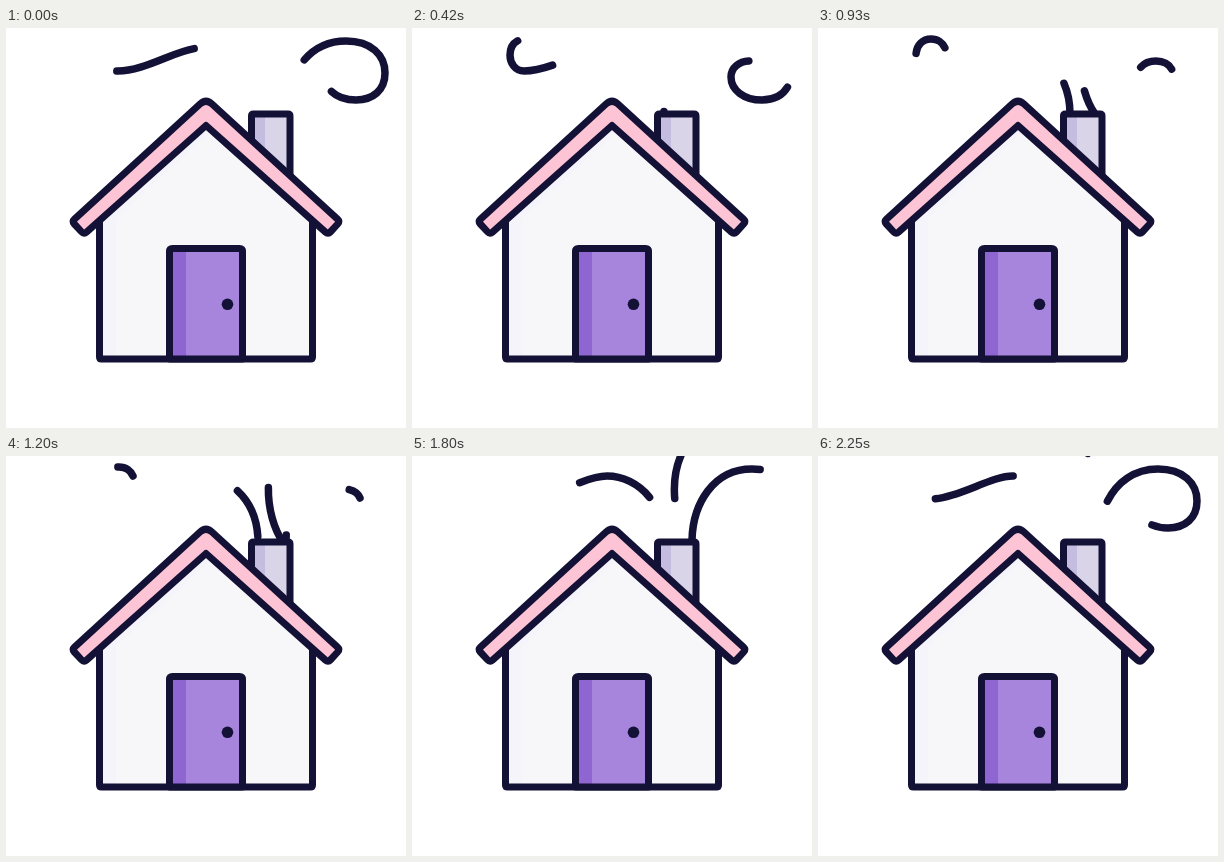
Recreate the animation shown at these times as an HTML page with a canvas. Size 400x400 px, loop 2310 ms.

```html
<!DOCTYPE html>
<html lang="en">
<head>
<meta charset="utf-8">
<title>House with smoke</title>
<style>
html, body { margin: 0; width: 100%; height: 100%; overflow: hidden; background: #fff; }
canvas { display: block; width: 400px; height: 400px; }
</style>
</head>
<body>
<canvas id="stage" width="400" height="400"></canvas>
<script>
const LOOP = 2310, STEP = 30, LAG = 690;
const INK = '#131136';
const ctx = document.getElementById('stage').getContext('2d');
ctx.lineCap = ctx.lineJoin = 'round';

const clamp = (v) => Math.min(1, Math.max(0, v));

const ease = (start, duration) => (t) => {
  const u = clamp((t - start) / duration);
  return u * u * (3 - 2 * u);
};

// Smooth curve through [time, progress] keys, flat at both ends
const through = (keys) => {
  const last = keys.length - 1;
  const slope = (i) => i === 0 || i === last ? 0 :
    (keys[i + 1][1] - keys[i - 1][1]) / (keys[i + 1][0] - keys[i - 1][0]);
  return (t) => {
    if (t <= keys[0][0]) return 0;
    if (t >= keys[last][0]) return 1;
    const i = keys.findIndex((key) => key[0] > t) - 1;
    const [t0, p0] = keys[i], [t1, p1] = keys[i + 1];
    const span = t1 - t0, u = (t - t0) / span, v = 1 - u;
    return clamp(p0 * (1 + 2 * u) * v * v + p1 * u * u * (3 - 2 * u) +
      span * (slope(i) * u * v * v - slope(i + 1) * u * u * v));
  };
};

const wisp = (d, progress) => {
  const path = document.createElementNS('http://www.w3.org/2000/svg', 'path');
  path.setAttribute('d', d);
  return { path: new Path2D(d), length: path.getTotalLength(), progress };
};

const wisps = [
  wisp('M252 86C252 43 222 20 195 20C172 20 140 43 112 43C103 43 98 35 98 27' +
    'C98 18 104 11 113 11C120 11 125 15 127 20', ease(240, 3110)),
  wisp('M277 86C263 66 256 27 270 -3L273 -8', ease(520, 1230)),
  wisp('M280 86C280 50 300 13 340 13C365 13 379 27 379 45C379 62 367 72 350 72' +
    'C332 72 319 62 319 49C319 39 328 33 338 33C346 33 352 37 354 42',
    through([[960, 0], [1110, .01], [1470, .084], [1620, .196], [1860, .44],
      [2250, .751], [2550, .876], [2910, .968], [3240, .995], [3560, 1]]))
];

const wall = new Path2D('M93.5 190L200 96L306.5 190V329Q306.5 331 304.5 331H95.5Q93.5 331 93.5 329Z');
const wallLight = new Path2D('M110 190L206 103L306.5 190V331H110Z');
const roof = new Path2D('M68.5 191.2L194 76Q200 70.5 206 76L331.5 191.2Q334 193.5 331.7 196' +
  'L324.3 204Q322 206.5 319.5 204.2L200 97.5L80.5 204.2Q78 206.5 75.7 204L68.3 196Q66 193.5 68.5 191.2Z');
const chimney = new Path2D('M245.5 160V88Q245.5 86 247.5 86H282Q284 86 284 88V160Z');
const door = new Path2D('M163.5 331V223.5Q163.5 220.5 166.5 220.5H233.5Q236.5 220.5 236.5 223.5V331Z');

function fill(path, color) {
  ctx.fillStyle = color;
  ctx.fill(path);
}

function outline(path) {
  ctx.strokeStyle = INK;
  ctx.lineWidth = 7;
  ctx.stroke(path);
}

function rect(x, y, w, h, color) {
  ctx.fillStyle = color;
  ctx.fillRect(x, y, w, h);
}

function drawWisp({ path, length, progress }, time) {
  const head = progress(time), tail = progress(time - LAG);
  if (head <= 0 || tail >= 1) return;
  ctx.save();
  ctx.strokeStyle = INK;
  ctx.lineWidth = 7.5;
  ctx.setLineDash([Math.max(.01, (head - tail) * length), length * 2]);
  ctx.lineDashOffset = -tail * length;
  ctx.stroke(path);
  ctx.restore();
}

function drawHouse() {
  fill(chimney, '#d9d4e8');
  rect(248, 88, 11, 60, '#c5bde0');
  outline(chimney);

  fill(wall, '#f4f4fa');
  fill(wallLight, '#f7f7fa');
  outline(wall);

  fill(door, '#a885dd');
  rect(166, 223, 14, 106, '#8f66d1');
  outline(door);
  ctx.beginPath();
  ctx.arc(221.5, 276.3, 5.8, 0, Math.PI * 2);
  ctx.fillStyle = INK;
  ctx.fill();

  fill(roof, '#fcc4d4');
  outline(roof);
}

function draw(time) {
  rect(0, 0, 400, 400, '#fff');
  // Each puff outlives one loop, so the previous one is still fading out
  for (const w of wisps) {
    drawWisp(w, time);
    drawWisp(w, time + LOOP);
  }
  drawHouse();
}

const origin = performance.now();
function tick() {
  const t = (performance.now() - origin) % LOOP;
  draw(Math.min(LOOP - 2 * STEP, Math.floor(t / STEP) * STEP));
  requestAnimationFrame(tick);
}
tick();
</script>
</body>
</html>
```
